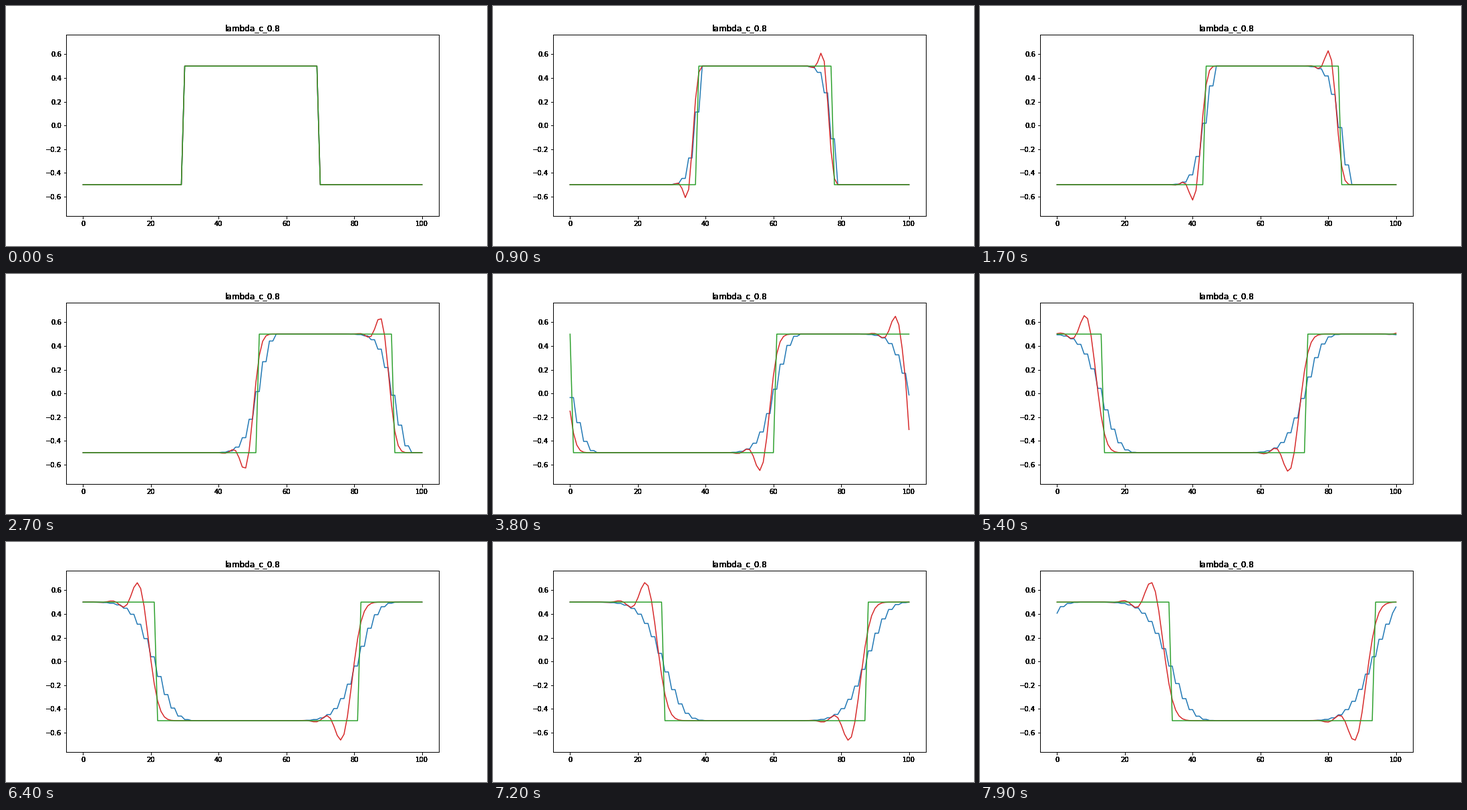
Animation, 720 px wide and 360 px high, one loop 8000 ms. Source, as a matplotlib script:

```python
import numpy as np
import matplotlib.pyplot as plt
from matplotlib.animation import FuncAnimation

C = 0.8          # Courant number
N = 100          # cells in the periodic domain
STEPS = 80
x = np.arange(N + 1)


def pulse(pos):
    pos = np.round(np.mod(pos, N), 6)
    return np.where((pos >= 30) & (pos < 70), 0.5, -0.5)


def lax_friedrichs(u):
    left, right = np.roll(u, 1), np.roll(u, -1)
    return (left + right) / 2 - C / 2 * (right - left)


def lax_wendroff(u):
    left, right = np.roll(u, 1), np.roll(u, -1)
    return u - C / 2 * (right - left) + C**2 / 2 * (right - 2 * u + left)


def solve(scheme):
    """History of the solution; the end point lags the first by one step."""
    u = pulse(x[:-1])
    rows = [np.append(u, u[0])]
    for _ in range(STEPS - 1):
        old = u
        u = scheme(u)
        rows.append(np.append(u, old[0]))
    return rows


exact = [pulse(x - C * n) for n in range(STEPS)]
runs = [solve(lax_friedrichs), solve(lax_wendroff), exact]

fig = plt.figure(figsize=(10, 5), dpi=72, facecolor="white")
plt.rcParams.update({"font.family": "DejaVu Sans", "font.size": 10})

# Stacked identical axes give the heavy, hard-edged lettering
for i in range(8):
    ax = fig.add_axes([0.125, 0.125, 0.775, 0.755], facecolor="none",
                      label=f"layer{i}")
    ax.set(xlim=(-5, 105), ylim=(-0.764, 0.764))
    ax.set_title(f"lambda_c_{C}", fontsize=12)

lines = [ax.plot(x, run[0], color=color, lw=1.5)[0]
         for run, color in zip(runs, ("tab:blue", "tab:red", "tab:green"))]


def update(n):
    for line, run in zip(lines, runs):
        line.set_ydata(run[n])
    return lines


anim = FuncAnimation(fig, update, frames=STEPS, interval=100,
                     repeat=True, repeat_delay=0)
plt.show()
```
